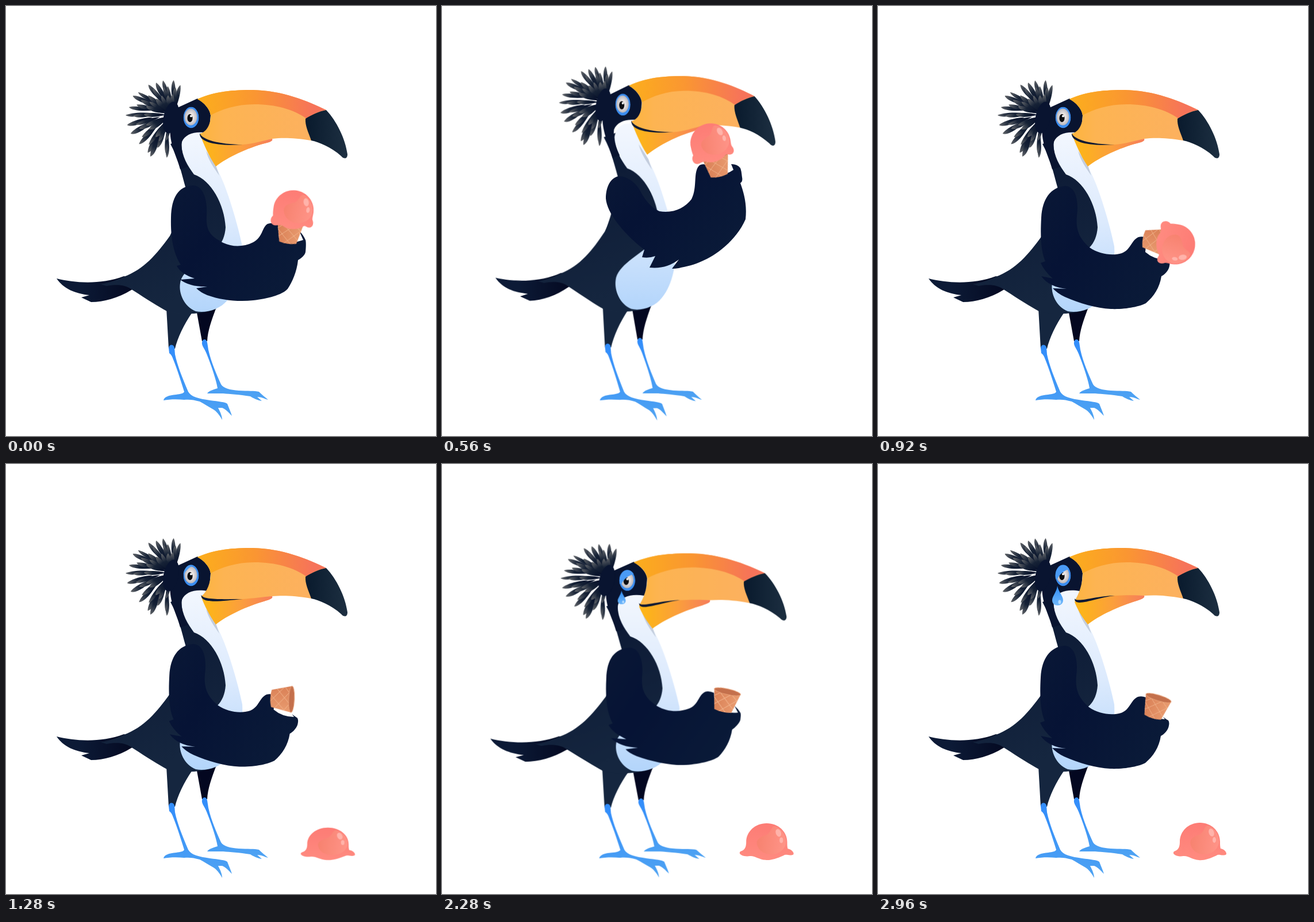
These frames come from a looping animation (748 by 748 pixels, 3000 ms). An HTML page:

```html
<!DOCTYPE html>
<html lang="en">
<head>
<meta charset="utf-8">
<title>Toucan and ice cream</title>
<style>
html, body { margin: 0; width: 100%; height: 100%; overflow: hidden; background: #fff; }
svg { display: block; width: 100vw; height: 100vh; }
.a { animation: 3s ease-in-out infinite; }

#scene { transform-origin: 300px 680px; animation-name: sob; }
@keyframes sob {
  0%, 72% { transform: scale(1, 1); }
  78.667% { transform: scale(1.027, .974); }
  84% { transform: scale(1.011, .99); }
  88%, 100% { transform: scale(1, 1); }
}
#bird { transform-origin: 300px 680px; animation-name: hop; }
@keyframes hop {
  0% { transform: scale(1, 1); }
  10.667% { transform: scale(.973, 1.037); }
  18.667% { transform: scale(.975, 1.027); }
  26% { transform: scale(1.012, .985); }
  30.667%, 100% { transform: scale(1, 1); }
}
#body { transform-origin: 300px 530px; animation-name: lean; }
@keyframes lean {
  0% { transform: skewX(0deg); }
  10.667% { transform: skewX(3.1deg); }
  18.667% { transform: skewX(1deg); }
  27%, 100% { transform: skewX(0deg); }
}
#head { transform-origin: 321px 195px; animation-name: nod; }
@keyframes nod {
  0% { transform: translate(0, 0) rotate(0deg); }
  10.667% { transform: translate(-20px, -5px) rotate(-3.3deg); }
  18.667% { transform: translate(-7px, -9px) rotate(-.3deg); }
  28%, 100% { transform: translate(0, 0) rotate(0deg); }
}
#hair { transform-origin: 290px 195px; animation-name: sway; }
@keyframes sway {
  0% { transform: translate(0, 0) rotate(0deg); }
  10.667% { transform: translate(4px, -6px) rotate(3deg); }
  18.667%, 100% { transform: translate(0, 0) rotate(0deg); }
}
#tail { transform-origin: 210px 488px; animation-name: wag; }
@keyframes wag {
  0% { transform: rotate(0deg); }
  10.667% { transform: rotate(-6deg); }
  18.667% { transform: rotate(-2deg); }
  28%, 100% { transform: rotate(0deg); }
}

#wing { animation-name: wing, shift; }
@keyframes shift {
  0% { transform: translate(0, 0); }
  10.667% { transform: translate(-11px, -4px); }
  18.667%, 90.667% { transform: translate(0, 0); }
  98.667%, 100% { transform: translate(-1px, 3px); }
}
@keyframes wing {
  0% { d: path("M325 312C300 314 288 332 287 368C286 405 292 432 304 450L297 452Q304 466 328 474L303 476Q320 489 350 488L331 491Q338 498 350 503C375 512 405 515 430 512C455 509 480 503 490 492C498 480 506 462 508 442C512 440 520 434 521 428C522 418 522 410 521 407Q517 398 510 391L517 407Q497 415 475 404L473 380Q465 376 455 379C445 385 447 402 430 411C412 420 393 419 378 412C360 402 347 395 349 365C351 335 342 312 325 312Z"); }
  10.667%, 18.667% { d: path("M308 296C293 298 285 315 285 335C287 360 315 395 352 424L348 437Q360 439 371 435L361 455Q390 458 412 441L400 457Q406 457 412 456C425 453 440 450 452 444C475 435 512 408 528 371C531 345 525 325 519 308C522 306 523 303 522 298C521 290 521 288 519 282Q514 275 503 275L507 285Q490 297 468 291L459 276Q453 274 448 277C436 288 445 315 434 336C422 352 402 361 378 357C362 350 352 335 345 322C338 308 322 296 308 296Z"); }
  30.667%, 41.333% { d: path("M325 313C300 316 286 335 284 368C282 405 284 428 291 444L283 447Q290 462 304 474L284 470Q298 489 328 492L304 491Q312 500 325 506C350 517 380 526 405 527C430 528 455 523 466 517C480 505 490 490 493 470C498 468 506 460 507 452C508 447 507 445 506 443Q502 441 497 437L500 441Q480 441 465 428L467 403Q460 400 453 402C440 408 440 424 424 430C408 435 385 432 368 420C355 408 343 395 346 365C350 335 342 313 325 313Z"); }
  48%, 90.667% { d: path("M325 313C300 315 287 333 286 368C284 405 288 430 297 447L290 450Q297 464 320 475L294 473Q310 489 340 490L319 493Q325 500 338 505C362 514 392 521 418 521C442 520 468 514 478 506C489 494 498 478 501 458C505 456 514 446 515 441C516 433 516 430 515 428Q511 421 505 416L511 428Q490 430 472 420L470 393Q462 389 455 391C443 397 444 414 427 421C410 428 389 426 374 417C358 406 345 395 347 365C350 335 342 313 325 313Z"); }
  98.667%, 100% { d: path("M325 313C300 316 286 335 284 368C282 405 284 428 291 444L283 447Q290 462 304 474L284 470Q298 489 328 492L304 491Q312 500 325 506C350 517 380 526 405 527C430 528 455 523 466 517C480 505 490 490 493 470C498 468 506 460 507 452C508 447 507 445 506 443Q502 441 497 437L500 441Q480 441 465 428L467 403Q460 400 453 402C440 408 440 424 424 430C408 435 385 432 368 420C355 408 343 395 346 365C350 335 342 313 325 313Z"); }
}
#cone { animation-name: cone; }
@keyframes cone {
  0% { transform: translate(495px, 377px) rotate(8deg); }
  10.667% { transform: translate(464px, 258px) rotate(-13deg); }
  18.667% { transform: translate(475px, 261px) rotate(-12deg); }
  30.667%, 41.333% { transform: translate(497px, 411px) rotate(100deg); }
  48%, 90.667% { transform: translate(493px, 391px) rotate(13deg); }
  98.667%, 100% { transform: translate(488px, 407px) rotate(17deg); }
}
#scoop { animation-name: scoop; }
@keyframes scoop {
  0% { transform: translate(495px, 377px) rotate(8deg) translate(2px, -23px); }
  10.667% { transform: translate(464px, 258px) rotate(-13deg) translate(-3px, -24px); }
  18.667% { transform: translate(475px, 261px) rotate(-12deg) translate(-3px, -24px); }
  30.667% { transform: translate(497px, 411px) rotate(100deg) translate(0, -21px); }
  33.333% { transform: translate(500px, 414px) rotate(100deg) translate(0, -21px); animation-timing-function: cubic-bezier(.45, 0, .85, .6); }
  41.333%, 100% { transform: translate(560px, 657px) rotate(0deg) translate(0, 0); }
}
#ball { animation-name: melt; }
@keyframes melt {
  0%, 40% { d: path("M-35 0C-35 -19 -19 -34 0 -34C19 -34 35 -19 35 0C35 6 34 9 35 13C39 19 37 27 30 27C26 27 24 24 21 26C12 34 -4 36 -13 31C-18 28 -22 30 -26 31C-36 33 -40 22 -34 15C-35 10 -35 4 -35 0Z"); }
  43%, 100% { d: path("M-35 0C-35 -18 -20 -33 0 -33C20 -33 35 -18 35 0C35 5 35 8 36 12C44 13 49 22 44 23C38 25 33 21 29 24C16 30 6 33 -2 32C-14 31 -20 24 -29 25C-38 27 -50 22 -45 17C-41 15 -35 14 -35 0Z"); }
}
#splat { transform-origin: 0 31px; animation-name: splat; }
@keyframes splat {
  0%, 41% { transform: scale(1, 1); }
  43% { transform: scale(1.03, .86); }
  46.667%, 100% { transform: scale(1, 1); }
}

#beak { animation-name: beak; }
@keyframes beak {
  0%, 38.667% { d: path("M333 162C365 148 395 146 430 146C480 147 525 165 557 181L531 234C500 229 480 229 463 231C465 235 458 237 450 239C420 247 385 263 365 279C356 262 345 245 337 222C350 219 356 205 356 190C355 180 345 168 333 162Z"); }
  46.667%, 100% { d: path("M333 162C365 148 395 146 430 146C480 147 525 165 557 181L531 234C500 228 480 228 463 229C465 233 458 235 450 238C420 247 385 263 365 279C356 266 347 252 342 238C350 226 356 208 356 190C355 180 345 168 333 162Z"); }
}
#jaw { animation-name: jaw; }
@keyframes jaw {
  0%, 38.667% { d: path("M338 224C347 236 380 243 411 241C430 240 448 234 463 231C465 235 458 237 450 239C420 247 385 263 365 279C352 260 344 240 338 224Z"); }
  46.667%, 100% { d: path("M342 240C360 236 385 231 411 229C430 228 448 228 463 229C465 233 458 235 450 238C420 247 385 263 365 279C354 265 346 251 342 240Z"); }
}
#mouth { animation-name: mouth; }
@keyframes mouth {
  0%, 38.667% { d: path("M337 221C340 232 370 241 412 241C370 244 335 238 337 221Z"); }
  46.667%, 100% { d: path("M342 234C346 242 380 229 412 229C380 232 342 251 342 234Z"); }
}
#lid { animation-name: lid; }
@keyframes lid {
  0%, 38.667% { transform: translate(-8px, -30px); }
  45%, 100% { transform: translate(0, 0); }
}
#tear { transform-origin: 312px 212px; animation-name: tear; }
@keyframes tear {
  0%, 71% { transform: scale(0); }
  79%, 100% { transform: scale(1); }
}
</style>
</head>
<body>
<svg viewBox="0 0 748 748">
  <defs>
    <linearGradient id="gTail"><stop offset=".25" stop-color="#0c1a36"/><stop offset="1" stop-color="#02051c"/></linearGradient>
    <linearGradient id="gBody" x1="0" y1="0" x2=".3" y2="1"><stop offset="0" stop-color="#0a1632"/><stop offset="1" stop-color="#15263f"/></linearGradient>
    <linearGradient id="gBelly" x1="0" y1="0" x2="0" y2="1"><stop offset="0" stop-color="#f3f7fe"/><stop offset=".5" stop-color="#dceafd"/><stop offset="1" stop-color="#b3d5fb"/></linearGradient>
    <linearGradient id="gWing" x1="0" y1="0" x2="1" y2=".6"><stop offset="0" stop-color="#0a1836"/><stop offset=".4" stop-color="#061335"/><stop offset="1" stop-color="#0a1a38"/></linearGradient>
    <linearGradient id="gLeg" x1="0" y1="0" x2="0" y2="1"><stop offset="0" stop-color="#318cfb"/><stop offset="1" stop-color="#4fa3f2"/></linearGradient>
    <linearGradient id="gRidge"><stop offset="0" stop-color="#fcae1c"/><stop offset=".45" stop-color="#fa9632"/><stop offset=".9" stop-color="#f6735a"/></linearGradient>
    <linearGradient id="gPanel"><stop offset="0" stop-color="#fdb43c"/><stop offset=".2" stop-color="#fdb452"/><stop offset="1" stop-color="#fcb061"/></linearGradient>
    <linearGradient id="gJaw"><stop offset=".1" stop-color="#fdb41a"/><stop offset=".55" stop-color="#fb9f3c"/><stop offset="1" stop-color="#f67d5c"/></linearGradient>
    <linearGradient id="gTip"><stop offset="0" stop-color="#091a2d"/><stop offset="1" stop-color="#1d2f41"/></linearGradient>
    <linearGradient id="gFeather"><stop offset=".2" stop-color="#08122b"/><stop offset=".6" stop-color="#162236"/><stop offset="1" stop-color="#63666a"/></linearGradient>
    <linearGradient id="gCone"><stop offset="0" stop-color="#d97f55"/><stop offset="1" stop-color="#e99c70"/></linearGradient>
    <linearGradient id="gBall" x1="0" y1="0" x2="0" y2="1"><stop offset="0" stop-color="#fd7c75"/><stop offset="1" stop-color="#ff8b80"/></linearGradient>
    <linearGradient id="gCream"><stop offset="0" stop-color="#f5826c"/><stop offset="1" stop-color="#ff998c"/></linearGradient>
    <linearGradient id="gTear" x1="0" y1="0" x2="0" y2="1"><stop offset="0" stop-color="#2f8bf3"/><stop offset="1" stop-color="#70b8fb"/></linearGradient>
    <radialGradient id="gEye"><stop offset=".4" stop-color="#ece6e4"/><stop offset="1" stop-color="#b9b7be"/></radialGradient>
    <clipPath id="eyeClip"><ellipse cx="322" cy="194" rx="13.5" ry="18.5"/></clipPath>
    <clipPath id="coneClip"><path d="M-23 0L-15 35Q0 39 15 35L23 0Z"/></clipPath>
  </defs>

  <g id="scene" class="a">
    <g id="bird" class="a">
      <path id="tail" class="a" fill="url(#gTail)" d="M88 474C120 482 165 485 205 470L245 482L218 494C195 508 170 515 148 515L131 507L145 503C120 500 100 492 88 474Z"/>
      <path fill="#030720" d="M331 528L341 583H350C351 565 357 548 366 524Z"/>
      <path fill="url(#gLeg)" d="M341 588C340 579 348 577 350 585L352 598C357 620 366 640 374 658C378 665 390 668 405 669C420 670 433 669 440 671C444 675 450 680 456 685C449 683 444 680 437 680L445 687C437 686 430 682 425 679C405 676 390 675 378 674C368 674 359 674 350 674C353 669 362 667 368 665C366 650 355 620 349 605C346 597 342 593 341 588Z"/>
      <path fill="#15263f" d="M279 526L283 596H294C298 578 310 553 324 533Z"/>
      <path fill="url(#gLeg)" d="M284 604L283 595C284 588 291 588 293 594L294 606C298 625 306 645 317 671C322 680 335 683 355 686C370 688 382 689 385 692C388 700 391 706 393 713C387 707 382 701 376 699L369 699C373 707 376 713 376 720C371 711 366 705 361 702C352 697 345 692 337 688C327 685 318 684 310 685C298 684 285 684 274 686C275 680 283 677 296 676C303 675 309 674 310 671C303 648 297 630 291 615C289 609 287 606 284 604Z"/>

      <g id="body" class="a">
        <path fill="url(#gBody)" d="M286 240C300 265 305 290 313 318C305 340 296 380 285 400C262 432 240 458 205 471C190 478 178 482 165 484L175 487C190 484 208 484 220 494C245 510 265 523 280 531C295 536 335 539 365 527L400 450L384 360L330 225Z"/>
        <path fill="url(#gBelly)" d="M305 240C308 225 318 216 330 217L352 220L362 275C372 290 381 312 390 340C398 365 405 390 411 418C413 450 405 490 385 512C372 528 347 535 330 531C310 523 300 500 303 482C306 458 345 440 368 420C376 412 381 400 382 385C380 345 357 303 327 293C316 278 306 262 305 240Z"/>
        <path fill="#c3cddd" d="M348 252L365 277L371 295C362 282 352 268 348 252Z"/>
      </g>

      <g id="head" class="a">
        <path fill="#091430" d="M296 178L333 161C345 168 355 180 356 190L354 213L351 221C330 217 312 222 306 236C304 250 308 264 316 280L303 284C298 262 280 235 287 200Z"/>
        <g id="hair" class="a"></g>
        <path id="beak" class="a" fill="url(#gPanel)"/>
        <path fill="url(#gRidge)" d="M333 162C365 148 395 146 430 146C480 147 525 165 557 181C543 183 530 190 523 196C500 180 470 171 432 171C400 171 375 180 356 190C355 180 345 168 333 162Z"/>
        <path id="jaw" class="a" fill="url(#gJaw)"/>
        <path fill="url(#gTip)" d="M557 181C575 200 590 230 594 258C594 266 588 267 583 261C565 245 545 237 531 234C526 220 520 208 521 196C530 190 545 183 557 181Z"/>
        <path id="mouth" class="a" fill="#0b1933"/>
        <g clip-path="url(#eyeClip)">
          <ellipse cx="322" cy="194" rx="13.5" ry="18.5" fill="#3b8df0"/>
          <ellipse cx="321.5" cy="193" rx="11" ry="14.5" fill="url(#gEye)"/>
          <ellipse cx="320" cy="195" rx="4.6" ry="7" fill="#0a0b10"/>
          <circle cx="322" cy="191.5" r="2" fill="#fff"/>
          <path id="lid" class="a" fill="#4a9bf6" d="M300 168H340L338 181C328 183 317 189 312 200L300 202Z"/>
        </g>
        <g id="tear" class="a">
          <path fill="url(#gTear)" d="M312 212C314 222 322 230 322 237C322 249 303 249 303 237C303 230 311 222 312 212Z"/>
          <ellipse cx="316" cy="240" rx="2.5" ry="3.5" fill="#b5dcff"/>
        </g>
      </g>
    </g>

    <path id="wing" class="a" fill="url(#gWing)"/>

    <g id="cone" class="a">
      <path fill="url(#gCone)" d="M-23 0L-15 35Q0 39 15 35L23 0Z"/>
      <path clip-path="url(#coneClip)" fill="none" stroke="#f2b58d" d="M-26 8L8 40M-16 0L22 34M4 0L26 18M26 6L-10 40M12 0L-22 30M-6 0L-26 16"/>
      <ellipse rx="23" ry="5" fill="#c4704c" stroke="#e8a177"/>
    </g>

    <g id="scoop" class="a">
      <g id="splat" class="a">
        <path id="ball" class="a" fill="url(#gBall)"/>
        <path fill="url(#gCream)" d="M-16 6C-20 -8 -4 -10 2 -14C8 -20 8 -28 14 -28C28 -23 34 -10 33 2C31 14 20 22 8 22C-4 22 -13 16 -16 6Z" opacity=".75"/>
        <ellipse cx="20" cy="-16" rx="4.5" ry="7" transform="rotate(-18 20 -16)" fill="#ffb3aa"/>
        <ellipse cx="25" cy="-3" rx="3" ry="5" fill="#ffb3aa"/>
      </g>
    </g>
  </g>
</svg>
<script>
// Crest: rings of leaf-shaped feathers fanned from the crown to the nape, swept backwards.
let seed = 11;
const rnd = () => (seed = (seed * 16807) % 2147483647) / 2147483647;
const rings = [[1.03, 46, 15], [.84, 44, 14], [.62, 38, 12]];
const sweep = -14;
let crest = '';
for (const [size, len, count] of rings) {
  for (let i = 0; i < count; i++) {
    const k = (i + .6 * rnd()) / (count - .4);
    const angle = -63 - 192 * k;
    const start = (58 + 22 * Math.sin(2.2 * k)) * size * (.9 + .12 * rnd()) - len;
    const w = 6 + 3 * rnd();
    crest += `<path fill="url(#gFeather)" transform="translate(288 192) rotate(${angle}) translate(${start}) rotate(${sweep})"
      d="M0 0C${len * .4} ${-w * .6} ${len * .85} ${-w * .9} ${len} 0C${len * .85} ${w * .5} ${len * .4} ${w * .6} 0 0Z"/>`;
  }
}
crest += '<ellipse cx="287" cy="194" rx="13" ry="28" fill="#091430" transform="rotate(12 287 194)"/>';
document.getElementById('hair').innerHTML = crest;
</script>
</body>
</html>
```
